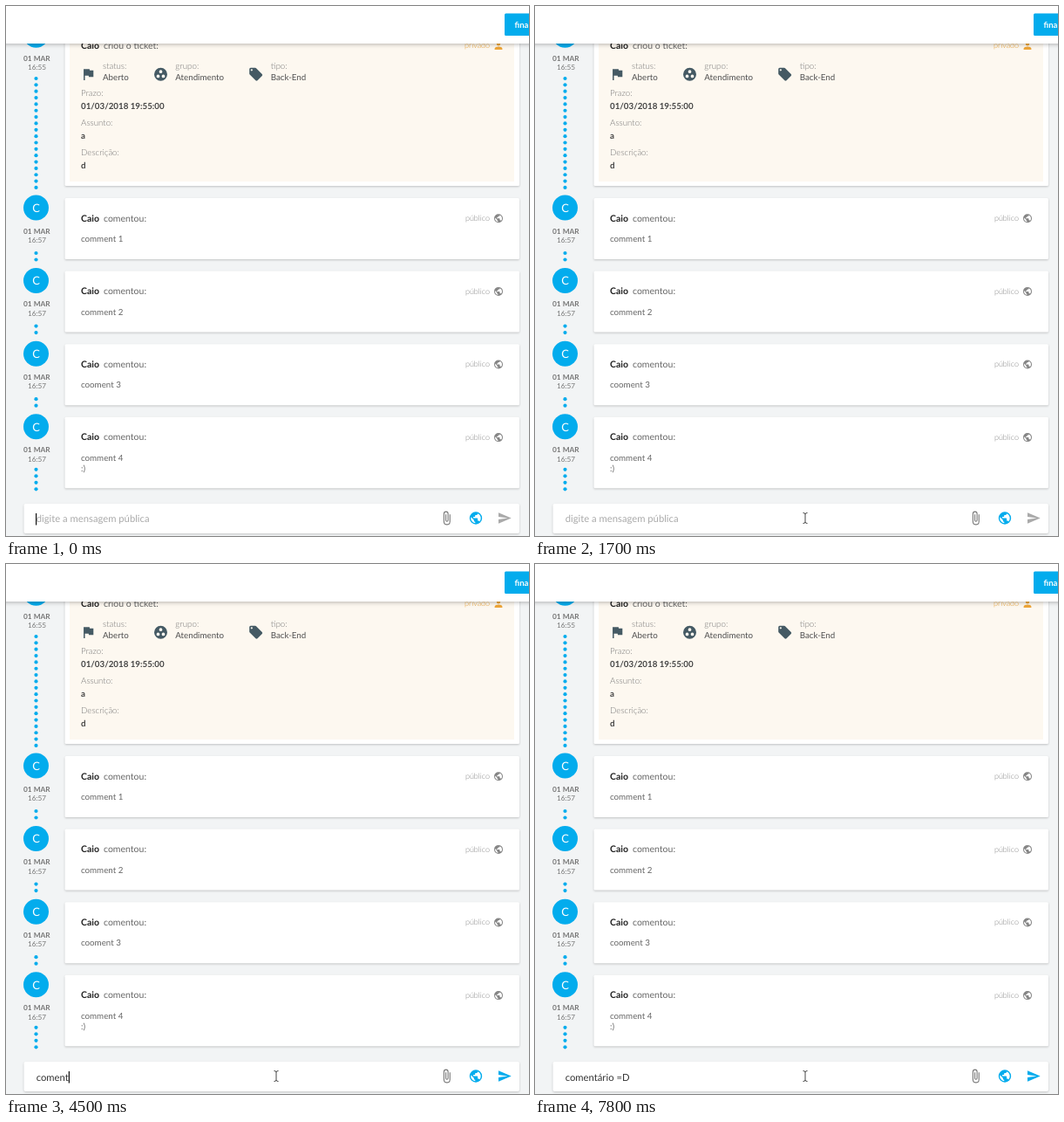
These frames come from a looping animation (600 by 607 pixels, 8 s). An HTML page:

```html
<!DOCTYPE html>
<html lang="pt">
<head>
<meta charset="utf-8">
<title>Ticket</title>
<style>
  html, body { margin: 0; height: 100%; overflow: hidden; background: #f2f4f5; }
  svg { display: block; width: 600px; height: 607px; font-family: Lato, sans-serif; text-rendering: geometricPrecision; }
  text { white-space: pre; }
  .card { fill: #fff; filter: drop-shadow(0 1px 1px rgba(0, 0, 0, .2)); }
  .header { fill: #fff; filter: drop-shadow(0 1.5px 2.5px rgba(0, 0, 0, .28)); }
  .blue { fill: #03aced; }
  .orange { fill: #eda63a; }
  .slate { fill: #455a64; }
  .grey { fill: #858585; }
  .name { font-size: 10.5px; font-weight: 700; fill: #222; }
  .action { font-size: 10.5px; fill: #666; }
  .body { font-size: 9.75px; fill: #666; }
  .value { font-size: 9.75px; fill: #505050; }
  .strong { font-size: 9.75px; font-weight: 700; fill: #444; }
  .label { font-size: 9.75px; font-weight: 300; fill: #777; }
  .access { font-size: 9px; font-weight: 300; text-anchor: end; }
  .initial { font-size: 13px; fill: #fff; text-anchor: middle; }
  .date { font-size: 8.3px; font-weight: 700; fill: #777; text-anchor: middle; }
  .time { font-size: 8.25px; fill: #777; text-anchor: middle; }
  .button { font-size: 9.5px; font-weight: 700; fill: #fff; }
  .input { font-size: 11.25px; }
</style>
</head>
<body>
<svg id="stage" viewBox="0 0 600 607"></svg>
<script>
const ICONS = {
  flag: 'M14.4 6L14 4H5v17h2v-7h5.6l.4 2h7V6z',
  group: 'M12 2a10 10 0 1 0 0 20a10 10 0 1 0 0-20zM8 17.5a2.5 2.5 0 1 1 0-5a2.5 2.5 0 1 1 0 5zM12 10.5a2.5 2.5 0 1 1 0-5a2.5 2.5 0 1 1 0 5zM16 17.5a2.5 2.5 0 1 1 0-5a2.5 2.5 0 1 1 0 5z',
  tag: 'M21.4 11.6l-9-9Q11.8 2 11 2H4a2 2 0 0 0-2 2v7q0 .8.6 1.4l9 9q1.4 1.2 2.8 0l7-7q1.2-1.4 0-2.8zM5.5 7a1.5 1.5 0 1 1 0-3a1.5 1.5 0 1 1 0 3z',
  globe: 'M12 2a10 10 0 1 0 0 20a10 10 0 1 0 0-20zM11 19.9A8 8 0 0 1 4.2 10.2L9 15v1a2 2 0 0 0 2 2zM17.9 17.4A2 2 0 0 0 16 16h-1v-3a1 1 0 0 0-1-1H8v-2h2a1 1 0 0 0 1-1V7h2a2 2 0 0 0 2-2v-.4a8 8 0 0 1 2.9 12.8z',
  person: 'M12 12a4 4 0 1 0 0-8a4 4 0 1 0 0 8zM12 14c-2.7 0-8 1.3-8 4v2h16v-2c0-2.7-5.3-4-8-4z',
  clip: 'M16.5 6v11.5a4 4 0 0 1-8 0V5a2.5 2.5 0 0 1 5 0v10.5a1 1 0 0 1-2 0V6H10v9.5a2.5 2.5 0 0 0 5 0V5a4 4 0 0 0-8 0v12.5a5.5 5.5 0 0 0 11 0V6z',
  send: 'M2 21L23 12 2 3v7l15 2-15 2z'
};
const AUTHOR = 'Caio';

const text = (x, y, cls, str) => `<text x="${x}" y="${y}" class="${cls}">${str}</text>`;
const rect = (x, y, w, h, attrs) => `<rect x="${x}" y="${y}" width="${w}" height="${h}" ${attrs}/>`;
const icon = (name, cx, cy, scale, attrs) =>
  `<path d="${ICONS[name]}" fill-rule="evenodd" transform="translate(${cx} ${cy}) scale(${scale}) translate(-12 -12)" ${attrs}/>`;
const card = (y, bottom) => rect(67.5, y, 521.5, bottom - y, 'rx="1.5" class="card"');

function timeline(cy, time, firstDot, count, step = 7.5) {
  let out = `<circle cx="34.5" cy="${cy}" r="14.5" class="blue"/>`
    + text(34.5, cy + 4.7, 'initial', AUTHOR[0])
    + text(35.3, cy + 29.6, 'date', '01 MAR')
    + text(35.5, cy + 40, 'time', time);
  for (let i = 0; i < count; i++)
    out += `<circle cx="34.5" cy="${firstDot + i * step}" r="2.1" class="blue"/>`;
  return out;
}

const heading = (y, action) => text(86, y, 'name', AUTHOR) + text(112, y, 'action', action);

function comment(index, lines) {
  const top = 220 + index * 83.6;
  const last = index === 3;
  return card(top, top + (last ? 81.5 : 70))
    + timeline(top + 11, '16:57', top + 63 - (last ? 3 : 0), last ? 4 : 2)
    + heading(top + 26.5, 'comentou:')
    + text(555, top + 26, 'access grey', 'público')
    + icon('globe', 565, top + 23.3, .5, 'class="grey"')
    + lines.map((line, i) => text(86, top + 50 + i * 12, 'body', line)).join('');
}

function field(x, label, value, name, iconX) {
  return icon(name, iconX, 78.2, .75, 'class="slate"')
    + text(x, 71.5, 'label', label) + text(x, 85, 'value', value);
}

const ticket = card(10, 206) + rect(73, 20, 510, 181, 'fill="#fdf8f0"')
  + timeline(33.2, '16:55', 83, 18, 7.35)
  + heading(48.6, 'criou o ticket:')
  + text(555, 48, 'access orange', 'privado')
  + icon('person', 565, 45.5, .55, 'class="orange"')
  + field(111, 'status:', 'Aberto', 'flag', 94.3)
  + field(194.3, 'grupo:', 'Atendimento', 'group', 177.5)
  + field(303.8, 'tipo:', 'Back-End', 'tag', 286.7)
  + [['Prazo:', '01/03/2018 19:55:00'], ['Assunto:', 'a'], ['Descrição:', 'd']].map(([label, value], i) =>
      text(86, 103 + i * 34.2, 'label', label) + text(86, 118 + i * 34.2, 'strong', value)).join('');

const header = rect(-10, -10, 620, 53, 'class="header"')
  + rect(572, 8.5, 60, 25.5, 'rx="1.5" class="blue"')
  + text(583.5, 24.8, 'button', 'finalizar');

const inputBar = rect(20.5, 570, 568.5, 34, 'rx="2" class="card"')
  + '<text id="entry" x="34.7" class="input"></text>'
  + rect(0, 581, 1.2, 13.5, 'id="caret" fill="#111"')
  + icon('clip', 505.5, 586.5, .72, 'fill="#777"')
  + icon('globe', 539, 586.5, .72, 'class="blue"')
  + icon('send', 572, 586.5, .7, 'id="send"')
  + '<path id="pointer" d="M307.5 580.5q2.5 0 2.5 1.5q0-1.5 2.5-1.5M310 582v9M307.5 592.5q2.5 0 2.5-1.5q0 1.5 2.5 1.5" fill="none" stroke="#444"/>';

const $ = id => document.getElementById(id);
$('stage').innerHTML = ticket
  + [['comment 1'], ['comment 2'], ['cooment 3'], ['comment 4', ':)']].map((lines, i) => comment(i, lines)).join('')
  + header + inputBar;

const LOOP = 8000;
const MESSAGE = 'comentário =D';
const KEY_TIMES = [2800, 3000, 3300, 3600, 4300, 4400, 4600, 4700, 4800, 4900, 5400, 5800, 6300];
const mix = (a, b, p) => a.map((v, i) => Math.round(v + (b[i] - v) * p));

function render(t) {
  const typed = KEY_TIMES.filter(k => k <= t).length;
  const entry = $('entry');
  entry.textContent = typed ? MESSAGE.slice(0, typed) : 'digite a mensagem pública';
  entry.setAttribute('y', typed ? 592 : 591);
  entry.setAttribute('fill', typed ? '#333' : '#aaa');

  // Each keystroke restarts the caret blink.
  const sinceKey = typed ? t - KEY_TIMES[typed - 1] : t + 100;
  $('caret').setAttribute('visibility', sinceKey % 1000 < 500 ? 'visible' : 'hidden');
  $('caret').setAttribute('x', typed ? 34.7 + entry.getComputedTextLength() : 34);

  const active = Math.min(1, Math.max(0, (t - KEY_TIMES[0]) / 300));
  $('send').setAttribute('fill', `rgb(${mix([170, 170, 170], [3, 172, 237], active)})`);
  $('pointer').setAttribute('visibility', t < 100 ? 'hidden' : 'visible');
}

const start = performance.now();
function tick() {
  render((performance.now() - start) % LOOP);
  requestAnimationFrame(tick);
}
tick();
</script>
</body>
</html>
```
